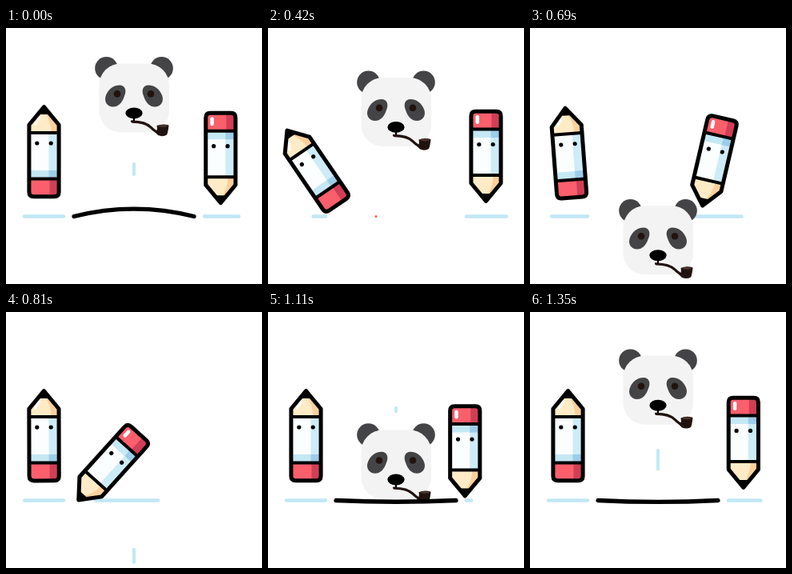
These frames come from a looping animation (320x320 px, 1.38 s). An HTML page with a canvas:

```html
<!DOCTYPE html>
<html lang="en">
<head>
<meta charset="utf-8">
<title>Panda and pencils</title>
<style>
html, body { margin: 0; width: 100%; height: 100%; overflow: hidden; background: #fff; }
canvas { display: block; width: 320px; height: 320px; }
</style>
</head>
<body>
<canvas id="stage"></canvas>
<script>
const LOOP = 1380, GROUND = 235.5, BLUE = '#c0e8f4', INK = '#000';
const canvas = document.getElementById('stage');
const ctx = canvas.getContext('2d');
const dpr = window.devicePixelRatio || 1;
canvas.width = canvas.height = 320 * dpr;

const clamp = v => Math.max(0, Math.min(1, v));
const span = (t, a, b) => clamp((t - a) / (b - a));
const mix = (a, b, u) => a + (b - a) * u;
const pose = (a, b, u) => a.map((v, i) => mix(v, b[i], u));
const easeIn = u => u * u;
const easeOut = u => 1 - (1 - u) * (1 - u);
const easeInOut = u => u * u * (3 - 2 * u);

function stroke(path, color, width) {
  ctx.strokeStyle = color;
  ctx.lineWidth = width;
  ctx.stroke(new Path2D(path));
}
function fill(path, color) {
  ctx.fillStyle = color;
  ctx.fill(new Path2D(path));
}
function oval(x, y, rx, ry, color) {
  ctx.fillStyle = color;
  ctx.beginPath();
  ctx.ellipse(x, y, rx, ry, 0, 0, 7);
  ctx.fill();
}
function box(x, y, w, h, color, r = 0) {
  ctx.fillStyle = color;
  ctx.beginPath();
  ctx.roundRect(x, y, w, h, r);
  ctx.fill();
}

// Upright pencil with its point at the origin, body below.
function pencilBody(eyeY, pointDown) {
  fill('M0 2L-18 25V35H18V25Z', '#ffecc6');
  fill('M0 2L18 25V35H9Q9 20 0 8Z', '#fcd09c');
  box(-18, 35, 36, 57, '#fbfeff');
  box(6, 35, 12, 57, '#cdecf7');
  box(-18, 82, 36, 10, '#c5e8f5');
  box(6, 82, 12, 10, '#9ccde9');
  box(-18, 92, 36, 22, '#fb5f6c', [0, 0, 5, 5]);
  box(7, 92, 11, 22, '#d03f56', [0, 0, 5, 0]);
  if (pointDown) box(-13, 99, 4.5, 11, '#fff', 2.2);
  else stroke('M-6 16L-11 24', '#fffdf6', 3.5);
  stroke('M0 2.6L-18.6 25V109Q-18.6 114.8 -12.8 114.8H12.8Q18.6 114.8 18.6 109V25Z', INK, 5);
  stroke('M-18 35H18M-18 92.5H18', INK, 4);
  fill('M0 2L-8 12H8Z', INK);
  oval(-8.7, eyeY, 2.6, 2.6, INK);
  oval(8.7, eyeY, 2.6, 2.6, INK);
}
function pencil([x, y, degrees], pointDown) {
  ctx.save();
  ctx.translate(x, y);
  ctx.rotate(degrees * Math.PI / 180);
  if (pointDown) ctx.scale(1, -1);
  else ctx.translate(0, -117.5);
  pencilBody(pointDown ? 73.5 : 48, pointDown);
  ctx.restore();
}

function panda(top) {
  ctx.save();
  ctx.translate(160, top);
  for (const s of [-1, 1]) oval(s * 34.5, 14.3, 14.3, 14.3, '#444446');
  box(-43.5, 8.3, 87.5, 86, '#f3f3f3', 27);
  ctx.save();
  for (let side = 0; side < 2; side++) {
    fill('M-18 35.500C-11 35.500 -9 42 -12 49C-15 58 -20 62.500 -26 62.500C-34 62.500 -38 55 -35 48C-32 40 -25 35.500 -18 35.500Z', '#444446');
    oval(-21, 46.3, 4.3, 4.3, '#21130f');
    ctx.scale(-1, 1);
  }
  ctx.restore();
  oval(0, 70.3, 10.6, 7, INK);
  stroke('M0 75V79Q0 81 -3 80.5', INK, 2.2);
  stroke('M-2 81Q14 81 21 88Q27 94 32 95', '#20120e', 3.2);
  fill('M28.500 86Q36 83 43.500 85.500Q42.500 95 41 97.500Q36 100.500 30 98L26 94Q30 93 28.500 86Z', '#20120e');
  oval(36, 86.3, 6, 1.5, '#4a342b');
  ctx.restore();
}

// Eraser end of the left pencil: x, y, angle.
function leftPose(t) {
  const home = [47.5, 213.5, 0], right = [250, 226, -45], left = [101.5, 226, -45];
  if (t < 180) return pose(home, right, easeIn(t / 180));
  if (t < 360) return pose(right, left, easeInOut(span(t, 180, 360)));
  return pose(left, home, easeOut(span(t, 360, 840)));
}
// Point of the right pencil: x, y, angle.
function rightPose(t) {
  const home = [272.5, 219, 0], left = [89, 237, 42], right = [242.5, 234.5, 0];
  if (t < 540) t += LOOP;
  if (t >= 1080) return pose(right, home, easeOut(span(t, 1080, 1560)));
  if (t < 810) return pose(home, left, easeIn(span(t, 540, 810)));
  const u = span(t, 810, 1080), p = pose(left, right, easeInOut(u));
  p[2] = 42 * (1 - u * u);
  return p;
}

function pandaTop(t) {
  if (t < 180) t += LOOP;
  if (t < 825) return 7.7 + 0.00079 * (t - 180) ** 2;
  if (t < 1110) return mix(-100, 137.5, easeIn(span(t, 810, 1110)));
  if (t < 1140) return mix(137.5, 164, easeOut(span(t, 1110, 1140)));
  return mix(164, 7.7, easeOut(span(t, 1140, 1560)));
}

function lineSag(t) {
  if (t < 180) t += LOOP;
  if (t < 1110) return 0;
  if (t < 1140) return 27 * easeOut(span(t, 1110, 1140));
  const d = t - 1140;
  return 27 * (1 - clamp(d / 420)) * Math.cos(2 * Math.PI * d / 172);
}
function rope(t) {
  let end = 235;
  if (t >= 180 && t < 360) end = Math.min(235, leftPose(t)[0] - 14);
  else if (t >= 360 && t < 820) return;
  else if (t >= 820 && t < 1080) end = Math.min(235, rightPose(t)[0]);
  if (end < 85) return;
  stroke(`M85 ${GROUND}Q${(85 + end) / 2} ${GROUND + 2 * lineSag(t)} ${end} ${GROUND}`, INK, 5.3);
}

function dash(a, b) {
  if (b - a > 0.5) stroke(`M${a} ${GROUND}H${b}`, BLUE, 4.4);
}
function groundDashes(t) {
  if (t < 180) {
    const u = easeIn(t / 180);
    dash(23 + 107 * u, 72 + 127 * u);
  } else if (t < 270) {
    dash(mix(130, 199, span(t, 180, 270)), 199);
  } else if (t >= 360) {
    dash(23 + 44 * (1 - easeOut(span(t, 360, 840))), 72);
  }
  if (t < 540 || t >= 1080) {
    const u = easeOut(span(t < 540 ? t + LOOP : t, 1080, 1560));
    dash(248, 248 + 50 * u);
  } else if (t < 810) {
    const u = easeIn(span(t, 540, 810));
    dash(248 - 136 * u, 298 - 107 * u);
  } else {
    dash(112, mix(191, 112, span(t, 810, 900)));
  }
}

function trail(t, start, duration, from, to) {
  const u = ((t - start + LOOP) % LOOP) / duration;
  if (u < 1) stroke(`M160 ${mix(from, to, easeIn(u))}V${mix(from, to, easeOut(u)) + 0.01}`, BLUE, 4);
}

function crumbs(t) {
  for (let i = 0; i < 5; i++) {
    const life = span(t, 200 + 25 * i, 335 + 25 * i);
    if (life > 0 && life < 1) {
      const hop = 10 * Math.sin(Math.PI * clamp(life * 1.15));
      oval(225 - 22.5 * i, GROUND - hop, 1.5, 1.5, '#fb5f4c');
    }
  }
}

function draw(now) {
  const t = now % LOOP;
  ctx.setTransform(dpr, 0, 0, dpr, 0, 0);
  ctx.fillStyle = '#fff';
  ctx.fillRect(0, 0, 320, 320);
  ctx.lineCap = ctx.lineJoin = 'round';
  groundDashes(t);
  trail(t, 700, 130, 250, 314);
  trail(t, 985, 130, 60, 124);
  trail(t, 1186, 222, 230, 169);
  panda(pandaTop(t));
  rope(t);
  crumbs(t);
  pencil(rightPose(t), true);
  pencil(leftPose(t), false);
}

const begin = performance.now();
function tick() {
  draw(performance.now() - begin);
  requestAnimationFrame(tick);
}
tick();
</script>
</body>
</html>
```
